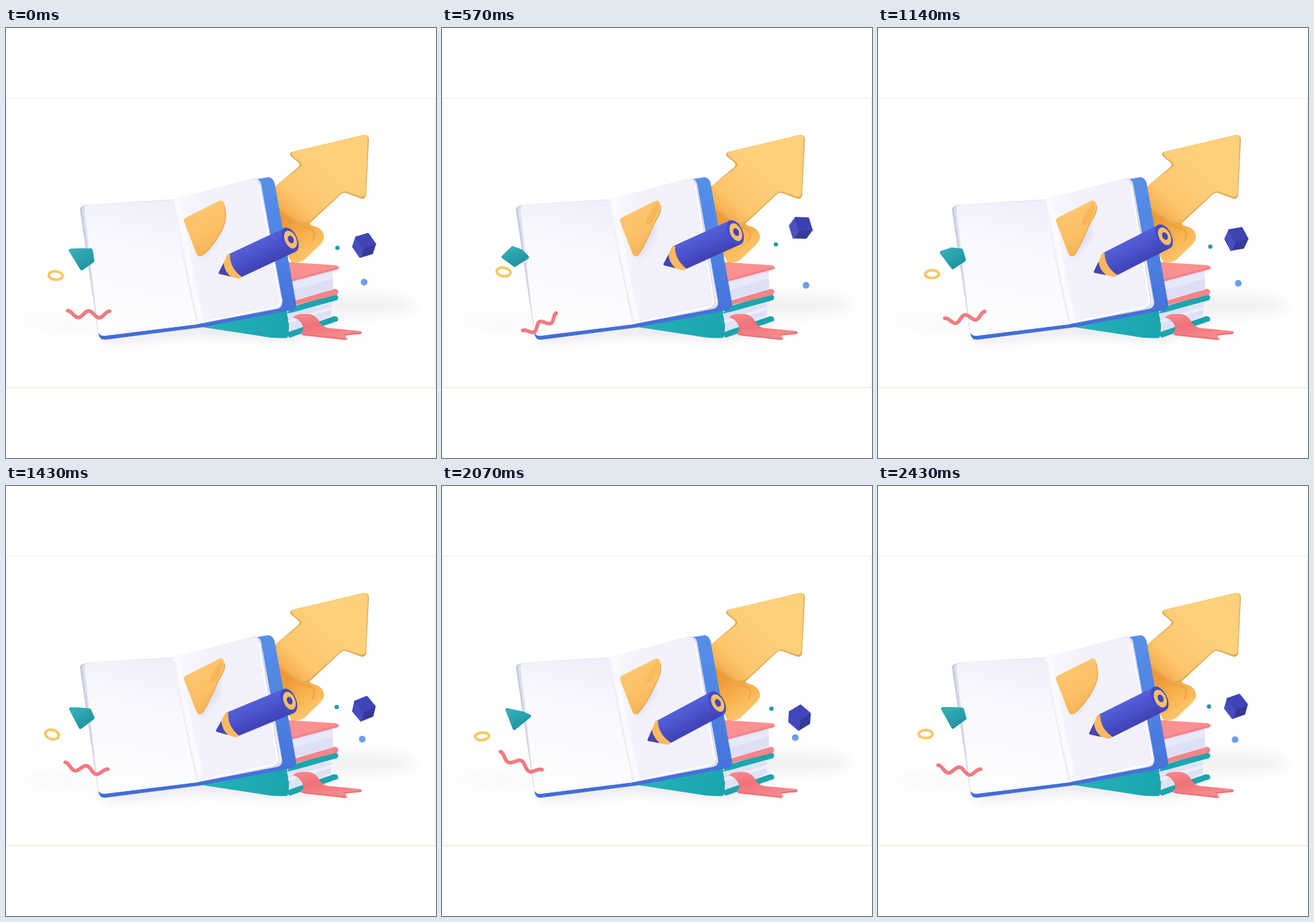
Animation, 640 px wide and 640 px high, one loop 2500 ms. Source, as an HTML page:

```html
<!DOCTYPE html>
<html lang="en">
<head>
<meta charset="utf-8">
<title>Notebook and pencil</title>
<style>
  html, body { margin: 0; width: 100%; height: 100%; overflow: hidden; background: #fff; }
  svg { display: block; width: 100%; height: 100%; }
</style>
</head>
<body>
<svg viewBox="0 0 640 640">
  <defs>
    <filter id="soft" x="-50%" y="-100%" width="200%" height="300%"><feGaussianBlur stdDeviation="9"/></filter>
    <filter id="blur" x="-30%" y="-30%" width="160%" height="160%"><feGaussianBlur stdDeviation="4"/></filter>
    <linearGradient id="arrowFace" gradientUnits="userSpaceOnUse" x1="480" y1="210" x2="412" y2="284">
      <stop offset="0" stop-color="#fdd07c"/><stop offset=".65" stop-color="#fdc66c"/><stop offset="1" stop-color="#f2a443"/>
    </linearGradient>
    <linearGradient id="arrowFoot" gradientUnits="userSpaceOnUse" x1="425" y1="285" x2="455" y2="335">
      <stop offset="0" stop-color="#ee9a38"/><stop offset=".5" stop-color="#f8b14e"/><stop offset="1" stop-color="#fdc466"/>
    </linearGradient>
    <linearGradient id="cover" x1="0" y1="0" x2="0" y2="1">
      <stop offset="0" stop-color="#5890e8"/><stop offset=".5" stop-color="#4c80e2"/><stop offset="1" stop-color="#426bd6"/>
    </linearGradient>
    <linearGradient id="leftPage" x1=".6" y1="0" x2=".4" y2="1">
      <stop offset="0" stop-color="#efeffb"/><stop offset=".35" stop-color="#f8f8fe"/><stop offset="1" stop-color="#fefeff"/>
    </linearGradient>
    <linearGradient id="rightPage" x1="0" y1=".4" x2="1" y2=".6">
      <stop offset="0" stop-color="#f8f8fe"/><stop offset=".25" stop-color="#f2f2fb"/><stop offset="1" stop-color="#f1f1fc"/>
    </linearGradient>
    <linearGradient id="flapFill" x1=".2" y1="0" x2=".6" y2="1">
      <stop offset="0" stop-color="#fdc872"/><stop offset=".6" stop-color="#fcc066"/><stop offset="1" stop-color="#f6b154"/>
    </linearGradient>
    <linearGradient id="pencilFill" x1="0" y1="0" x2="0" y2="1">
      <stop offset="0" stop-color="#5560d6"/><stop offset=".5" stop-color="#4a51c9"/><stop offset="1" stop-color="#4041b3"/>
    </linearGradient>
    <linearGradient id="tealFill" x1=".2" y1="0" x2=".8" y2="1">
      <stop offset="0" stop-color="#34aeb8"/><stop offset="1" stop-color="#1d929d"/>
    </linearGradient>
    <linearGradient id="spineFill"><stop offset="0" stop-color="#27b2b8"/><stop offset="1" stop-color="#1ba4ad"/></linearGradient>
    <linearGradient id="ribbonFill" x1="0" y1="0" x2=".6" y2="1">
      <stop offset="0" stop-color="#fa8a8c"/><stop offset=".45" stop-color="#ee7379"/><stop offset="1" stop-color="#fb8d8e"/>
    </linearGradient>
    <clipPath id="frame"><path d="M1 105H639V535H1Z"/></clipPath>
  </defs>

  <path d="M0 104.5H640M.5 104V535M639.5 104V535" stroke="#eeeeee"/>
  <path d="M0 535.5H640" stroke="#ebe3c6"/>

  <g clip-path="url(#frame)" filter="url(#soft)">
    <ellipse cx="525" cy="412" rx="84" ry="15" fill="#f0f0f1"/>
    <ellipse cx="90" cy="437" rx="70" ry="15" fill="#fafafa"/>
    <path d="M140 455L425 425L500 440L430 463L280 456L150 468Z" fill="#e4e4ec"/>
  </g>

  <!-- arrow -->
  <path d="M400 256L398 300L425 349Q438 350 444 345L467 323Q475 315 473 308Q470 297 455 294L440 280Z" fill="url(#arrowFoot)"/>
  <path fill="#e2aa54" d="M427 184L533 159Q541 159 540 168L536 249Q534 257 526 253L507 246Q503 244 499 247L455 288Q446 298 432 289L396 262L398 238L435 207Q439 203 434 199L424 191Q421 186 427 184Z"/>
  <path fill="url(#arrowFace)" d="M428 184L532 159Q539 159 538.500 167L535 246Q533 254 525 250L508 244Q503 242 498 246L454 286Q445 294 432 286L396 261L398 238L438 207Q442 203 437 199L427 191Q423 186 428 184Z"/>
  <path d="M440 297Q452 296 457 302Q462 309 455 317" fill="none" stroke="#e49b3c" stroke-width="3" opacity=".5"/>

  <!-- stacked books -->
  <path d="M284 444L418 421Q424 440 419 461Q402 463 376 458Z" fill="url(#spineFill)"/>
  <path d="M418 425L484 409V428L424 452Z" fill="#dfe1f5"/>
  <path d="M420 437L484 417" stroke="#eeeffb" stroke-width="4"/>
  <path d="M416 454L488 429Q496 429 494 436L422 461Z" fill="#1ba4ad"/>
  <path d="M425 415L490 396Q497 399 493 405L428 423L418 425Z" fill="#1ba6af"/>
  <path d="M425 407L490 388Q497 390 493 397L429 413Z" fill="#f4858a"/>
  <path d="M422 376L486 359L487 389L429 405Z" fill="#dedff4"/>
  <path d="M425 380L486 363V373L428 390Z" fill="#e8e9f8"/>
  <path d="M412 348L491 353Q498 355 494 359L425 377L416 379Z" fill="#fc9090"/>
  <path d="M424 376L494 357" stroke="#f3828a" stroke-width="3"/>
  <path fill="url(#ribbonFill)" d="M427 431Q432 424 453 426Q462 428 468 440Q474 447 484 447L528 451Q532 454 526 456L504 457L508 462Q508 466 502 464L446 458Q438 456 440 452Q445 450 440 440Q435 432 427 431Z"/>
  <path d="M441 456L504 463M504 457L528 454" stroke="#ea6f76" stroke-width="2" stroke-linecap="round"/>

  <!-- open notebook -->
  <path d="M110 270Q111 264 119 264L140 450L143 464L138 459Z" fill="#c6c8dc"/>
  <path d="M366 226L391 222Q398 223 400 232L432 411Q432 418 426 420L288 446L147 464Q139 464 138 455Z" fill="url(#cover)"/>
  <path d="M113 272Q113 263 121 263L250 255L368 224Q378 223 380 233L411 407Q412 416 404 418L284 441L149 458Q139 460 137 451Z" fill="#dddef0"/>
  <path d="M117 272Q116 264 124 263L250 256Q253 300 284 439L149 455Q139 457 137 448Z" fill="url(#leftPage)"/>
  <path d="M248 256Q254 252 264 251L366 225Q375 224 377 234L409 405Q410 413 402 415L284 439Q256 310 248 256Z" fill="url(#rightPage)"/>
  <path d="M256 254Q268 340 291 438" stroke="#fdfdff" stroke-width="8" fill="none" opacity=".7"/>
  <path d="M249 256Q264 340 284 439" stroke="#e8e8f4" fill="none"/>
  <path d="M284 440L149 456.500Q139 458 137 449" stroke="#fff" stroke-width="2" fill="none"/>
  <path id="pageEdge" stroke="#fff" stroke-width="2.500" fill="none"/>
  <path id="pageGap" stroke="#d3d4ea" stroke-width="1.200" fill="none"/>

  <!-- paper flap -->
  <path d="M276 292L318 282L318 310L293 345Z" fill="#cfcde8" opacity=".5" filter="url(#blur)"/>
  <path id="flap" fill="url(#flapFill)"/>
  <path id="flapRim" fill="none" stroke="#eba94e" stroke-width="1.500"/>
  <path id="curl" d="M303 292Q306 274 322 260Q323 271 316 284Q309 296 303 292Z" fill="#f2a746"/>

  <!-- floating pieces -->
  <ellipse id="ring" fill="none" stroke="#f5c866" stroke-width="4"/>
  <path id="gem" fill="url(#tealFill)" stroke="url(#tealFill)" stroke-width="5" stroke-linejoin="round"/>
  <path id="wave" fill="none" stroke="#f27a80" stroke-width="5.500" stroke-linecap="round" stroke-linejoin="round"/>
  <circle id="tealDot" r="3.200" fill="#2299a9"/>
  <circle id="blueDot" r="5" fill="#6c9fe9"/>
  <g id="cube" stroke-width="3" stroke-linejoin="round"></g>

  <g id="pencil">
    <path d="M24 -19.500L117 -19.500V19.500H24Q17 0 24 -19.500Z" fill="url(#pencilFill)"/>
    <path d="M0 0L21 -18Q25 -21 27 -18.500Q18 0 29 19.500Q25 21 21 18Z" fill="#fbba60"/>
    <path d="M0 -1L13 -11Q9 0 14 12L0 1Z" fill="#4746b2"/>
    <ellipse cx="117" rx="11" ry="19.500" fill="#444bc0"/>
    <ellipse cx="118" rx="8.500" ry="14" fill="#f8bf68"/>
    <ellipse cx="118.500" rx="4" ry="6" fill="#4345b4"/>
  </g>
</svg>
<script>
const PERIOD = 2500, STEPS = 35;

const el = id => document.getElementById(id);
const set = (id, attrs) => Object.entries(attrs).forEach(([k, v]) => el(id).setAttribute(k, v));
const polygon = pts => "M" + pts.join("L") + "Z";
const rotate = (a, b, angle) => [
  a * Math.cos(angle) - b * Math.sin(angle),
  a * Math.sin(angle) + b * Math.cos(angle)
];

// The gem's corners at rest and at the two ends of its swing.
const gem = {
  rest: [[96, 331], [112, 330], [127, 330], [129, 347], [113, 358]],
  near: [[91, 341], [105, 327], [118, 332], [127, 341], [108, 353]],
  far: [[97, 333], [108, 336], [120, 339], [130, 342], [107, 361]]
};

function drawGem(swing) {
  const end = swing > 0 ? gem.near : gem.far;
  const corners = gem.rest.map((p, i) => p.map((v, k) => v + (end[i][k] - v) * Math.abs(swing)));
  set("gem", { d: polygon(corners) });
}

function drawWave(swing) {
  const cx = 124 + 16 * swing + 8 * swing * swing, cy = 427 + 15 * swing;
  const tilt = (-1 - 27 * swing) * Math.PI / 180, length = 62 - 6 * swing;
  const pts = Array.from({ length: 41 }, (_, i) => {
    const u = i / 40;
    const [x, y] = rotate(length * (u - .5), -5 * Math.cos(u * 4 * Math.PI), tilt);
    return [cx + x, cy + y];
  });
  set("wave", { d: "M" + pts.join("L") });
}

function drawCube(swing) {
  const half = 10.5, roll = 1.3 + .3 * swing;
  const turn = ([x, y, z]) => {
    [x, z] = rotate(x, z, .6);
    [y, z] = rotate(y, z, .5);
    [x, y] = rotate(x, y, roll);
    return [x, y, z];
  };
  let faces = "";
  for (let axis = 0; axis < 3; axis++) for (const side of [-1, 1]) {
    const point = (a, b) => {
      const p = [];
      p[axis] = side;
      p[(axis + 1) % 3] = a;
      p[(axis + 2) % 3] = b;
      return turn(p);
    };
    const normal = point(0, 0);
    if (normal[2] <= 0) continue;
    const corners = [[-1, -1], [1, -1], [1, 1], [-1, 1]].map(([a, b]) => {
      const [x, y] = point(a, b);
      return [533 + swing + half * x, 322 - 25 * swing + half * y];
    });
    const light = 47 - 7 * normal[0] - 4 * normal[1];
    const colour = `hsl(238 48% ${light}%)`;
    faces += `<path d="${polygon(corners)}" fill="${colour}" stroke="${colour}"/>`;
  }
  el("cube").innerHTML = faces;
}

function drawPaper(curl) {
  const edge = `C327 ${273 - 2 * curl} ${328 - 6 * curl} ${283 - 2 * curl} ${325 - 7 * curl} ${292 - 6 * curl}`
    + `S${309 - 4 * curl} ${326 - 6 * curl} 291 339`;
  set("flap", { d: `M268 282L316 258Q324 254 325 264${edge}Q286 342 283 335L265 288Q264 284 268 282Z` });
  set("flapRim", { d: "M325 264" + edge });
  set("curl", { opacity: .45 * curl });

  const gap = 5 * curl;
  set("pageEdge", { d: `M377 234L${409 - gap} 405Q${410 - gap} 413 ${402 - gap} 415.500L284 439.500` });
  set("pageGap", { d: `M379 236L${411 - gap} 406Q${411 - gap} 415 ${403 - gap} 417` });
}

function draw(t) {
  const phase = 2 * Math.PI * t / PERIOD;
  const swing = Math.sin(phase - .06), wobble = Math.sin(2 * phase);

  set("pencil", {
    transform: `translate(${317.5 + 12.5 * swing} ${364.5 - 11 * swing - 5 * wobble}) rotate(${3.5 * wobble - 25.2})`
  });
  set("tealDot", { cx: 493.5 + 3.5 * swing, cy: 327 - 5 * swing });
  set("blueDot", { cx: 533.5 + 8.5 * swing, cy: 378.5 + 4.5 * swing });

  const cx = 75 + 17 * swing, cy = 368 - 5 * swing;
  set("ring", { cx, cy, rx: 10.3, ry: 6.2 + .8 * wobble, transform: `rotate(${5 + 12 * wobble} ${cx} ${cy})` });

  drawGem(swing);
  drawWave(swing);
  drawCube(swing);
  drawPaper(Math.min(1, 1.1 * (1 - Math.cos(phase))));
}

function tick() {
  const step = Math.floor((performance.now() % PERIOD + 5) * STEPS / PERIOD) % STEPS;
  draw(step * PERIOD / STEPS);
  requestAnimationFrame(tick);
}
tick();
</script>
</body>
</html>
```
